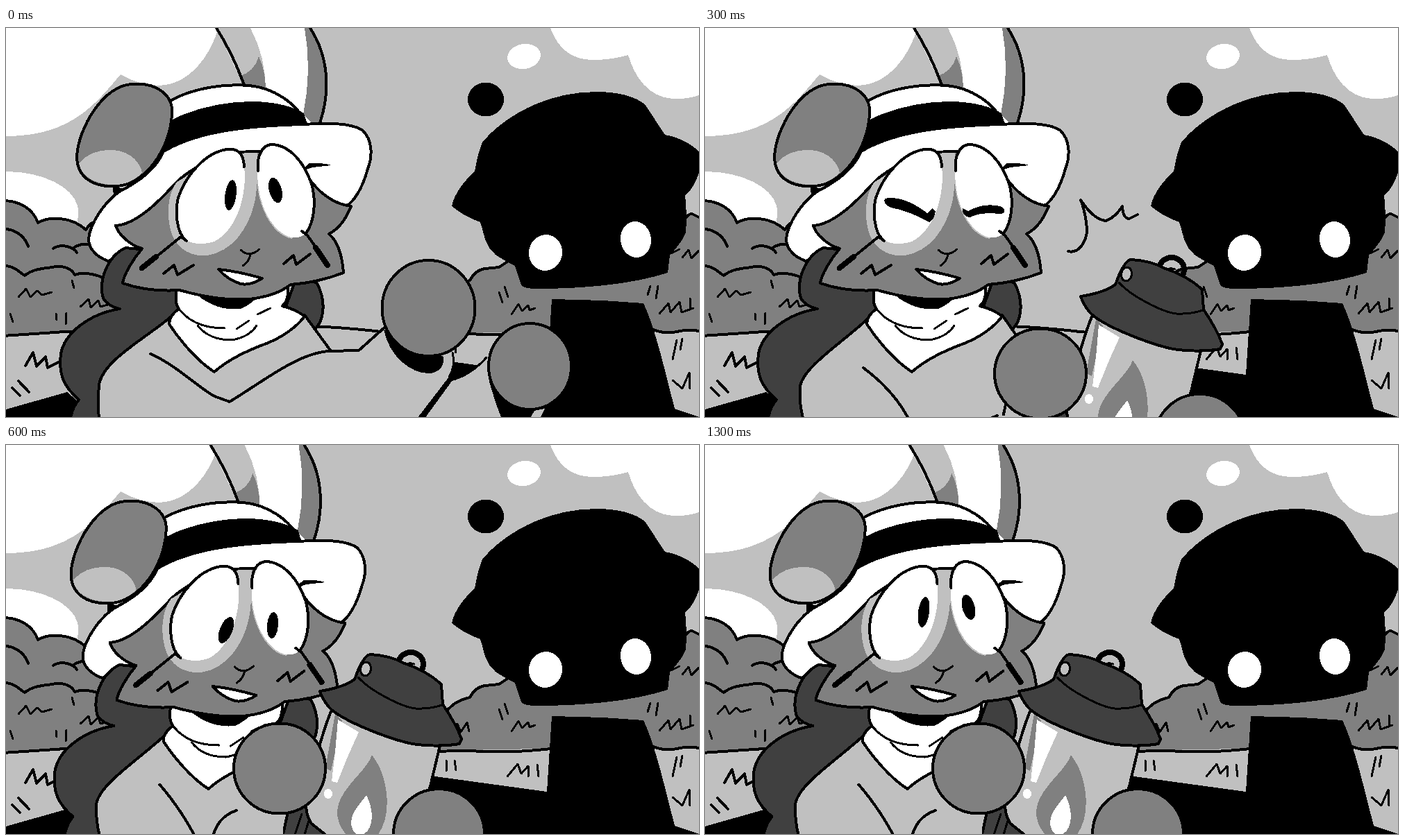
Write an HTML page that moves like this. It is 998x561 px and loops after 1900 ms.

```html
<!DOCTYPE html>
<html lang="en">
<head>
<meta charset="utf-8">
<title>Lantern</title>
<style>
  html, body { margin: 0; width: 100%; height: 100%; overflow: hidden; background: #c0c0c0; }
  svg { display: block; width: 100vw; height: 100vh; shape-rendering: crispEdges; }
  path, ellipse { stroke-linejoin: round; stroke-linecap: round; }
  .k { fill: #000; }
  .d { fill: #404040; }
  .m { fill: #808080; }
  .l { fill: #c0c0c0; }
  .w { fill: #fff; }
  .o { stroke: #000; stroke-width: 4; }
  .n { fill: none; stroke: #000; stroke-width: 4; }
  .t { stroke-width: 3; }
</style>
</head>
<body>
<svg viewBox="0 0 998 561" preserveAspectRatio="none">
  <g id="scenery">
    <path class="l" d="M0 0H998V561H0Z"/>
    <path class="w" d="M0 0H306C292 45 262 82 220 83C198 82 180 76 165 67C130 108 95 156 0 156Z"/>
    <path class="w" d="M0 207C60 207 105 235 104 265Q104 278 100 292H0Z"/>
    <path class="w" d="M784 0C795 30 815 46 845 46Q872 46 896 39C905 70 925 100 960 102Q980 103 998 97V0Z"/>
    <ellipse class="w" cx="746" cy="41" rx="24" ry="18" transform="rotate(-10 746 41)"/>
    <ellipse class="k" cx="691" cy="103" rx="26" ry="24.5"/>

    <path class="m o" d="M-4 249C20 249 40 262 46 281C62 271 95 272 115 291Q121 281 127 280L170 300V437L85 438L-4 444Z"/>
    <path class="n" d="M0 290C15 291 28 302 32 315M68 318C80 310 98 316 102 324M96 318Q108 309 122 313"/>
    <path class="n" d="M0 343C12 344 18 351 27 357C40 346 58 347 72 344Q92 343 99 356Q114 350 140 360"/>
    <path class="n t" d="M18 388L29 376L35 388L45 379L52 385L66 381M107 402L119 391L122 403L133 393L136 402L150 398M95 364L98 375M6 412L10 424M72 412L73 421M87 411L86 427"/>
    <path class="n" d="M28 487L39 468L44 488L57 474L60 490L75 482M9 519L20 530M18 509L33 525"/>

    <path class="m" d="M606 441C610 410 620 395 640 378Q650 368 668 364Q676 349 690 347L710 345L722 337L800 330H950L976 278Q984 265 990 269L998 273V437Q985 435 960 440L932 435Z"/>
    <path class="n" d="M606 441C610 410 620 395 640 378Q650 368 668 364Q676 349 690 347L710 345L722 337M976 278Q984 265 990 269L998 273M440 430Q490 432 540 438L600 443Q650 440 690 442T785 438M932 435Q950 442 966 438T998 437"/>
    <path class="n t" d="M710 381L715 396M718 373L723 388M728 413L738 398L743 408L752 400L754 407L762 404M642 412L650 402L655 414L664 400L667 413M634 455V470M646 455L648 469M722 478L737 460L742 474L752 463V478M765 461L767 478"/>
    <path class="n t" d="M928 372L924 385M939 372L936 390M941 412L954 397L957 410L970 395L973 410L990 404M985 390V404M958 325L970 319M974 331L983 320L987 332L998 321M966 450L960 478M974 448L971 464M960 508L974 520L984 497L985 520"/>
    <path class="k" d="M0 550L88 525L130 561H0ZM560 470L779 500L786 391L860 393L918 397C936 435 950 500 963 549L998 561H560Z"/>
  </g>

  <g id="shade">
    <path class="k" d="M686 165C710 135 770 92 850 92C880 92 905 98 920 110L949 154C968 157 988 168 998 178V209Q990 232 978 242Q981 270 979 295Q974 308 956 328L953 353C900 370 830 376 765 376Q746 376 742 371L733 343L716 334C700 327 690 312 686 290L683 280Q660 272 642 257C645 240 660 220 675 207Q679 182 686 165Z"/>
    <ellipse class="w" cx="777" cy="324" rx="24" ry="26" transform="rotate(12 777 324)"/>
    <ellipse class="w" cx="907" cy="305" rx="22" ry="26" transform="rotate(-8 907 305)"/>
  </g>

  <g class="head">
    <path class="w" d="M303 0L342 82L430 140L452 137C468 90 462 40 438 0Z"/>
    <path class="l" d="M303 0H352C368 30 374 60 374 90L345 86Z"/>
    <path class="m" d="M364 41C360 56 350 65 338 69L346 86L374 89Q374 62 364 41ZM430 0C437 40 437 80 428 125L440 137H452C468 90 462 40 438 0Z"/>
    <path class="n" d="M303 0Q326 36 343 82M438 0C464 40 468 90 452 137"/>
    <path class="k" d="M154 228L178 234L155 246Z"/>
    <path class="w o" d="M235 106C265 88 310 80 350 83C385 86 418 108 432 137L238 150Z"/>
    <path class="k" d="M236 134C270 115 320 105 360 106Q405 108 429 123L435 142L300 160L225 182Z"/>
    <path class="w o" d="M227 178C275 149 345 141 430 139C470 136 500 138 514 148C528 162 528 185 521 203C513 232 503 246 494 254L400 300L180 320L147 336C130 330 119 318 119 304C121 282 142 250 165 235C190 222 215 205 227 178Z"/>
    <path class="k" d="M422 208L437 195Q455 194 469 198L441 201Z"/>
    <path class="m o" d="M182 81C218 78 242 98 239 125C236 175 200 227 158 228C125 230 102 215 102 185C104 145 140 82 182 81Z"/>
    <path class="l" d="M105 195C118 180 135 175 155 176C180 178 194 195 196 209Q178 226 158 226C130 227 108 214 105 195Z"/>
    <path class="d o" d="M172 317C145 330 133 365 140 390Q148 402 164 405C120 412 84 440 79 470C76 495 80 515 105 536Q96 546 92 566H300V330ZM420 355L448 368Q463 398 452 425L444 436L400 410Z"/>
  </g>

  <g id="reach">
    <path class="l" d="M238 416C205 445 138 480 134 515Q132 535 134 566H597L640 503L650 470L545 432L508 466H468L430 414Z"/>
    <path class="n" d="M238 416C205 445 138 480 134 515Q132 535 134 566M208 470C245 486 275 517 300 531L322 539C370 510 420 469 465 466L508 465L545 432M430 414L468 466"/>
  </g>
  <g id="hug" class="head">
    <path class="l o" d="M238 418C198 455 145 488 139 516Q137 540 144 566H430L455 450L430 414Z"/>
    <path class="n" id="fold"/>
  </g>

  <g class="head">
    <path class="w o" d="M246 376Q242 396 249 405Q235 415 235 427C250 450 275 480 300 496C320 478 345 466 375 455Q410 441 430 416Q418 406 398 401Q408 392 406 372Z"/>
    <path class="n t" d="M249 405C265 426 290 433 315 433M276 429C290 447 310 450 325 450Q350 446 361 429M332 434L350 422M362 413L381 404"/>
    <path class="k" d="M270 380C288 398 312 408 338 405Q354 398 364 386Z"/>
    <path class="m o" d="M248 220C225 245 190 283 158 285C162 298 178 313 196 318C182 335 170 355 168 368Q205 381 250 378C285 388 320 393 350 391Q388 387 410 370Q450 367 486 353Q483 312 465 297Q485 287 497 257Q465 253 440 222C420 190 380 175 350 178C310 180 270 200 248 220Z"/>
    <path class="l" d="M246 222C232 240 230 275 240 300C250 322 270 330 290 328C330 322 355 280 360 240Q364 210 362 180H345L300 190ZM361 215C362 260 385 300 412 304L425 290Z"/>
    <path class="w" id="eyes" d="M318 175C335 172 344 190 344 215C343 260 325 295 300 308C285 313 268 312 258 305C246 295 243 265 248 245C258 215 285 180 318 175ZM384 168C366 168 360 195 363 225C366 260 385 295 410 302Q424 304 432 296C444 280 447 250 440 225C430 195 410 170 384 168Z"/>
    <path class="n" d="M343 200Q342 172 318 175C285 180 258 215 248 245C243 265 246 295 258 305M363 206C361 190 366 168 384 168C410 170 430 195 440 225C447 250 444 280 432 296"/>
    <g id="open">
      <ellipse class="k" id="pupilL"/>
      <ellipse class="k" id="pupilR"/>
    </g>
    <path class="k" id="shut" d="M261 246C282 241 307 255 322 267L329 260L334 264Q332 277 325 280C307 270 287 262 270 259Q258 254 261 246ZM373 260L381 264C397 255 414 253 430 258Q437 265 429 268C412 267 397 266 384 273Q372 272 373 260Z"/>
    <path class="n" d="M260 307L252 301L194 348M426 293L434 299L465 343M227 354L242 342L247 356L270 342M400 340L414 328L418 341L438 326"/>
    <path class="n" style="stroke-width:8" d="M216 330L196 346M446 317L463 342"/>
    <path class="n t" d="M338 320Q350 332 365 319M352 327Q350 337 341 343"/>
    <path class="w o" d="M306 348C325 350 345 354 369 361C358 368 348 371 338 369Q319 363 306 348Z"/>
  </g>

  <g id="reachHands">
    <path class="k" d="M544 435C552 475 585 500 612 498Q632 494 630 474Z"/>
    <path class="l" d="M597 561L640 508Q668 502 692 475L720 561Z"/>
    <path class="n t" d="M643 468Q648 486 638 504M640 508Q668 502 692 475"/>
    <path class="k" d="M638 503L643 508L603 563H592ZM696 510Q706 545 714 563H764L760 540Z"/>
    <path class="l" d="M761 552L776 549L770 561H756Z"/>
    <ellipse class="m o" cx="608.5" cy="404" rx="67" ry="69"/>
    <ellipse class="m o" cx="754.5" cy="488" rx="59.5" ry="62"/>
  </g>

  <g id="lantern">
    <path class="d o" d="M408 520L398 566L480 590L440 520Z"/>
    <path class="n t" d="M426 532L416 562M436 542L430 562"/>
    <ellipse class="n" cx="583" cy="316" rx="18" ry="17" style="stroke-width:8"/>
    <path class="n t" d="M573 321Q577 312 588 316"/>
    <path class="l o" d="M472 375Q452 420 437 495Q426 525 440 546L470 570H588Q604 520 612 488L627 425Z"/>
    <path class="m" d="M474 388L460 466L468 470L484 398Z"/>
    <path class="w" d="M478 396L508 414Q491 450 477 487L469 485Q475 440 478 396Z"/>
    <ellipse class="w" cx="464" cy="503" rx="6" ry="7"/>
    <path class="m" d="M527 447C520 470 480 495 477 527Q476 546 491 563H535C548 545 552 520 546 490Q541 465 527 447Z"/>
    <path class="w" d="M519 505C508 520 497 530 497 545Q498 559 508 563C520 563 527 550 527 535Q526 518 519 505Z"/>
    <path class="d o" d="M452 355Q485 350 502 338Q514 304 524 302Q552 303 574 315Q605 325 627 345L629 374Q648 402 656 424L653 431C630 435 600 434 580 430C540 420 480 395 465 378Q456 367 452 355Z"/>
    <path class="n t" d="M507 335C525 355 570 378 590 380Q610 381 628 375"/>
    <ellipse class="l o t" cx="518" cy="323" rx="7.5" ry="10" transform="rotate(10 518 323)"/>
    <path class="l" d="M296 600V566C304 545 312 534 332 527L400 525L398 600Z"/>
    <path class="n" d="M297 566C304 545 312 534 332 527"/>
    <ellipse class="m o" cx="394" cy="466.5" rx="66" ry="65"/>
    <ellipse class="m o" cx="623.5" cy="561" rx="65.5" ry="65"/>
  </g>

  <path class="n" id="spark" d="M523 322C538 326 550 308 550 290Q548 265 541 248Q560 277 578 278Q592 272 601 257Q602 275 611 275L623 269"/>

  <g id="swoosh">
    <path class="d o" style="stroke-width:2" d="M1002 150C960 160 900 178 850 200Q802 222 800 237Q812 246 868 246C868 262 855 267 846 285C841 298 855 308 862 312C850 330 830 345 833 365Q836 390 860 396T916 402C915 415 903 427 898 437Q950 424 1002 407Z"/>
    <path class="l" d="M998 222Q962 245 949 268Q943 245 930 247C900 250 880 280 870 310Q850 366 868 370C890 376 898 351 918 354C942 354 938 385 955 389Q980 385 998 372Z"/>
    <path class="m" d="M940 303Q970 300 998 306V360Q977 366 967 349T940 303Z"/>
    <path class="w" d="M974 324L998 322V349Q980 349 974 324Z"/>
  </g>
</svg>
<script>
  const LOOP = 1900;
  // gaze: 0 ahead, 1 down, null closed; prop: lantern offset from its rest place
  const poses = [
    { at: 0, head: 0, gaze: 0 },
    { at: 200, head: 0, gaze: 0, swoosh: true },
    { at: 300, head: -2, gaze: null, prop: [89, 32], fold: 295, spark: true },
    { at: 400, head: -7, gaze: 1, prop: [-13, 5], fold: 265 },
    { at: 500, head: -8, gaze: 1, prop: [-4, 2], fold: 273 },
    { at: 600, head: -8.5, gaze: 1, prop: [0, 0], fold: 280 },
    { at: 1200, head: -8.5, gaze: 0.5, prop: [0, 0], fold: 280 },
    { at: 1300, head: -8.5, gaze: 0, prop: [0, 0], fold: 280 }
  ];
  const $ = id => document.getElementById(id);
  const heads = document.querySelectorAll('.head');
  const show = (id, on) => { $(id).style.display = on ? '' : 'none'; };
  const mix = (a, b, k) => a.map((v, i) => v + (b[i] - v) * k);

  function setPupil(id, ahead, down, k) {
    const [x, y, rx, ry, turn] = mix(ahead, down, k);
    const pupil = $(id);
    pupil.setAttribute('rx', rx);
    pupil.setAttribute('ry', ry);
    pupil.setAttribute('transform', `translate(${x} ${y}) rotate(${turn})`);
  }

  function draw(pose) {
    const { head, gaze, prop, fold } = pose;
    const held = !!prop;
    heads.forEach(h => h.setAttribute('transform', `translate(${head} 0)`));
    ['reach', 'reachHands'].forEach(id => show(id, !held));
    ['hug', 'lantern'].forEach(id => show(id, held));
    show('swoosh', pose.swoosh);
    show('spark', pose.spark);
    show('open', gaze !== null);
    show('shut', gaze === null);
    if (gaze !== null) {
      setPupil('pupilL', [323.5, 241, 8, 22, 8], [325.5, 267, 9, 20, 22], gaze);
      setPupil('pupilR', [388, 234, 9, 18.5, -15], [392.5, 260, 8, 19, 5], gaze);
    }
    if (held) {
      $('lantern').setAttribute('transform', `translate(${prop})`);
      $('fold').setAttribute('d', `M230 490Q${fold - 22} 522 ${fold} 563`);
    }
  }

  const start = performance.now();
  let shown;
  function tick() {
    const t = (performance.now() - start) % LOOP;
    const pose = poses.findLast(p => p.at <= t);
    if (pose !== shown) draw(shown = pose);
    requestAnimationFrame(tick);
  }
  tick();
</script>
</body>
</html>
```
